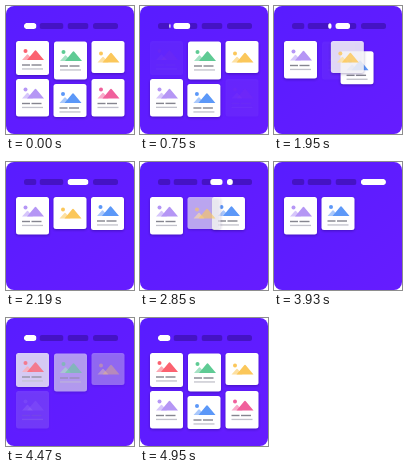
These frames come from a looping animation (128x128 px, 5.01 s). An HTML page with a canvas:

```html
<!DOCTYPE html>
<html>
<head>
<meta charset="utf-8">
<style>
html, body { margin: 0; width: 100%; height: 100%; overflow: hidden; background: #fff; }
canvas { display: block; width: 100vw; height: 100vh; }
</style>
</head>
<body>
<canvas></canvas>
<script>
const LOOP = 5010;
const canvas = document.querySelector('canvas');
const ctx = canvas.getContext('2d');

const pills = [[18, 30.5], [33.5, 57.5], [61.5, 82.5], [87, 112]];
const tabMoves = [[440, 520, 1], [1640, 510, 2], [2715, 440, 3], [3930, 520, 0]];

// Home position, height, then main and pale colours; "slot" sets the fade-in order
const cards = [
  { slot: 0, x: 10, y: 35, h: 34, tint: ['#fb6270', '#fda9b4'], out: 450 },
  { slot: 1, x: 48, y: 35.5, h: 38, tint: ['#5fcb94', '#a5e2c4'], out: 1650 },
  { slot: 3, x: 10, y: 73, h: 37.5, tint: ['#b596f5', '#d6c6fb'], out: 3930,
    moves: [[750, 280, 10, 35]] },
  { slot: 4, x: 47.5, y: 78, h: 33, tint: ['#5c98f8', '#a9c8fc'], out: 3930,
    moves: [[750, 280, 10, 77], [1640, 500, 85, 35], [2715, 440, 47.5, 35]] },
  { slot: 2, x: 85.5, y: 35, h: 32, tint: ['#fbc75a', '#fde0a0'], out: 2730, plain: true,
    moves: [[1640, 500, 47.5, 35]], dip: 0.25 },
  { slot: 5, x: 85.5, y: 73, h: 37.5, tint: ['#f0609c', '#f9aacb'], out: 450 }
];

const clamp = u => Math.max(0, Math.min(1, u));
const mix = (a, b, p) => a + (b - a) * p;

function ease(u) {
  u = clamp(u);
  return (u * u * (3 - 2 * u) + Math.sin(u * Math.PI / 2)) / 2;
}

function box(x, y, w, h, r) {
  ctx.beginPath();
  ctx.roundRect(x, y, w, h, r);
}

function hill(color, left, right, base, top) {
  const mid = (left + right) / 2;
  ctx.fillStyle = color;
  ctx.beginPath();
  ctx.moveTo(left, base);
  ctx.lineTo(mid - 1, top + 1);
  ctx.quadraticCurveTo(mid, top - 0.5, mid + 1, top + 1);
  ctx.lineTo(right, base);
  ctx.fill();
}

function drawCard({ h, tint, plain }, x, y, alpha) {
  if (alpha <= 0) return;
  ctx.save();
  ctx.globalAlpha = alpha;
  ctx.translate(x, y);
  ctx.save();
  ctx.shadowColor = 'rgba(20, 0, 90, .4)';
  ctx.shadowBlur = 3 * canvas.width / 128;
  ctx.shadowOffsetY = canvas.height / 128;
  ctx.fillStyle = '#fff';
  box(0, 0, 33, h, 2.5);
  ctx.fill();
  ctx.restore();

  ctx.translate(0, plain ? 2.5 : h > 35 ? 0.5 : 0);
  ctx.fillStyle = tint[0];
  ctx.beginPath();
  ctx.arc(9.5, 10, 2, 0, 7);
  ctx.fill();
  hill(tint[1], 6, 17, 19, 13);
  hill(tint[0], 11, 28, 19, 9);

  if (!plain) {
    ctx.fillStyle = '#85858f';
    ctx.fillRect(6, 23.3, 8, 1.4);
    ctx.fillRect(15.5, 23.3, 10, 1.4);
    ctx.fillStyle = '#c2c2cb';
    ctx.fillRect(6, 27.3, 21, 1.3);
  }
  ctx.restore();
}

function drawTabs(t) {
  let [left, right] = pills[0];
  for (const [start, length, tab] of tabMoves) {
    const p = ease((t - start) / length);
    left = mix(left, pills[tab][0], p);
    right = mix(right, pills[tab][1], p);
  }
  // The highlight shows only through the pills
  for (const [a, b] of pills) {
    ctx.save();
    box(a, 17, b - a, 6, 2.5);
    ctx.clip();
    ctx.fillStyle = '#4513c4';
    ctx.fillRect(a, 17, b - a, 6);
    ctx.fillStyle = '#fff';
    box(left, 17, right - left, 6, 2.5);
    ctx.fill();
    ctx.restore();
  }
}

function drawStage() {
  const bg = ctx.createLinearGradient(0, 0, 128, 128);
  bg.addColorStop(0, '#581cff');
  bg.addColorStop(1, '#661cff');
  ctx.fillStyle = bg;
  box(0, 0, 128, 128, 8);
  ctx.fill();
}

function draw(now) {
  const t = now % LOOP;
  const scale = devicePixelRatio || 1;
  const w = Math.round(innerWidth * scale), h = Math.round(innerHeight * scale);
  if (canvas.width !== w || canvas.height !== h) {
    canvas.width = w;
    canvas.height = h;
  }
  ctx.setTransform(w / 128, 0, 0, h / 128, 0, 0);
  ctx.clearRect(0, 0, 128, 128);
  drawStage();
  drawTabs(t);

  for (const card of cards) {
    let { x, y } = card;
    let alpha = 1 - clamp((t - card.out) / 315);
    for (const [start, length, toX, toY] of card.moves || []) {
      const p = ease((t - start) / length);
      x = mix(x, toX, p);
      y = mix(y, toY, p);
      alpha *= 1 - (card.dip || 0) * Math.sin(p * Math.PI);
    }
    drawCard(card, x, y, alpha);
    drawCard(card, card.x, card.y, clamp((t - 4200 - card.slot * 75) / 350));
  }
  requestAnimationFrame(draw);
}

requestAnimationFrame(draw);
</script>
</body>
</html>
```
